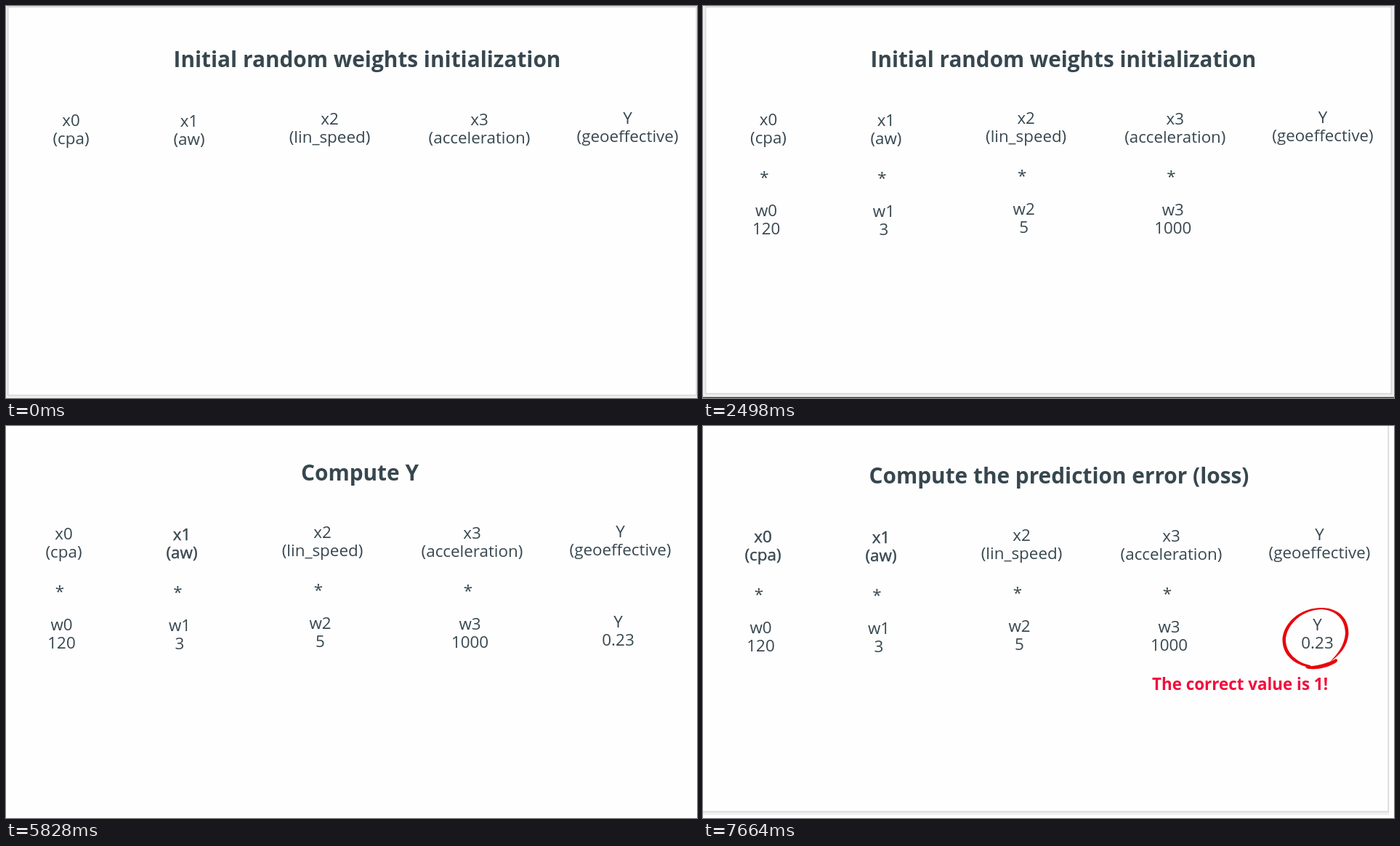
Animation of 951x539 px, one loop 8 s. Source, as an HTML page:

```html
<!DOCTYPE html>
<html lang="en">
<head>
<meta charset="utf-8">
<title>Weights and loss</title>
<style>
  html, body { margin: 0; width: 100%; height: 100%; overflow: hidden; background: #fefefe; }
  svg { display: block; width: 951px; height: 539px; }
  text { font: 22.4px "Open Sans", sans-serif; fill: #37474f; text-anchor: middle; }
  .title { font-size: 29.8px; font-weight: 700; }
  .heavy { stroke: #37474f; stroke-width: .4px; }
  .note { font-weight: 700; fill: #f00f3c; }
</style>
</head>
<body>
<svg viewBox="0 0 951 539">
  <rect id="backdrop" fill="#f0f0f0"/>
  <rect id="stripe" y="537.7" width="951" height="1.3" fill="#263c48"/>
  <g id="slide">
    <g id="card">
      <rect x="3" y="1.5" width="947" height="533.5" fill="none" stroke="#000" stroke-opacity=".06" stroke-width="3"/>
      <rect x="3" y="1.5" width="947" height="533.5" fill="#fefefe" stroke="#d2d2d2"/>
    </g>
    <text id="title" class="title" x="497" y="84"></text>
    <g id="labels"></g>
    <g id="weights"></g>
    <g id="result"></g>
    <g id="error" transform="translate(7 5)">
      <g fill="#e8060c">
        <path d="M836 332C816 329 797 316 797.5 293C799 272 820 250 851 250C874 250 889 264 888.500 286C887 302 877 315 863 324C874 313 883 301 884 285C884 267 872 253 851 252C823 253 803 274 802 294C802 312 818 326 836 329Z"/>
        <path d="M830 330C845 331 860 326 871 320C874 321 874 324 870 326C860 332 846 335 836 334C831 334 828 332 830 330Z"/>
      </g>
      <text class="note" x="739" y="363">The correct value is 1!</text>
    </g>
  </g>
</svg>
<script>
const LOOP = 8000;
const LINE = 25;
const $ = id => document.getElementById(id);

const columns = [
  { x: 89.5, y: 165, label: ["x0", "(cpa)"], weight: ["w0", "120"] },
  { x: 252, y: 166, label: ["x1", "(aw)"], weight: ["w1", "3"] },
  { x: 445.5, y: 163, label: ["x2", "(lin_speed)"], weight: ["w2", "5"] },
  { x: 651.5, y: 164, label: ["x3", "(acceleration)"], weight: ["w3", "1000"] },
  { x: 855.5, y: 162, label: ["Y", "(geoeffective)"] }
];

// heavy: how the first two labels are emphasised; backdrop: grey area [width, height]
const steps = [
  { at: 0, title: "Initial random weights initialization", move: [0, 0, 1],
    backdrop: [951, 539], card: true, heavy: [] },
  { at: 500, title: "Initial random weights initialization", move: [.85, 0, .9961],
    backdrop: [951, 539], card: true, heavy: [], weights: true, stripe: true },
  { at: 3830, title: "Compute Y", move: [-10, -9, 1],
    backdrop: [0, 0], heavy: [1], weights: true, result: true },
  { at: 7160, title: "Compute the prediction error (loss)", move: [-7, -5, 1],
    backdrop: [944, 535], card: true, heavy: [0, 1], weights: true, result: true, error: true }
];

function addText(parent, lines, x, y) {
  const group = document.createElementNS("http://www.w3.org/2000/svg", "g");
  lines.forEach((line, i) => {
    const text = document.createElementNS("http://www.w3.org/2000/svg", "text");
    text.setAttribute("x", x);
    text.setAttribute("y", y + i * LINE);
    text.textContent = line;
    group.append(text);
  });
  parent.append(group);
  return group;
}

const labels = columns.map(({ x, y, label, weight }) => {
  if (weight) {
    addText($("weights"), ["*"], x - 5.5, y + 78.5);
    addText($("weights"), weight, x - 3, y + 125);
  }
  return addText($("labels"), label, x, y);
});
addText($("result"), ["Y", "0.23"], 852.5, 286);

const show = (id, on) => $(id).setAttribute("visibility", on ? "visible" : "hidden");

let current;
function render(step) {
  if (step === current) return;
  current = step;
  const [x, y, scale] = step.move;
  $("slide").setAttribute("transform", `translate(${x} ${y}) scale(${scale})`);
  $("title").textContent = step.title;
  $("backdrop").setAttribute("width", step.backdrop[0]);
  $("backdrop").setAttribute("height", step.backdrop[1]);
  for (const id of ["card", "stripe", "weights", "result", "error"]) show(id, step[id]);
  labels.forEach((label, i) => label.setAttribute("class", step.heavy.includes(i) ? "heavy" : ""));
}

const start = performance.now();
function tick() {
  const time = (performance.now() - start) % LOOP;
  render(steps.findLast(step => step.at <= time));
  requestAnimationFrame(tick);
}
tick();
</script>
</body>
</html>
```
